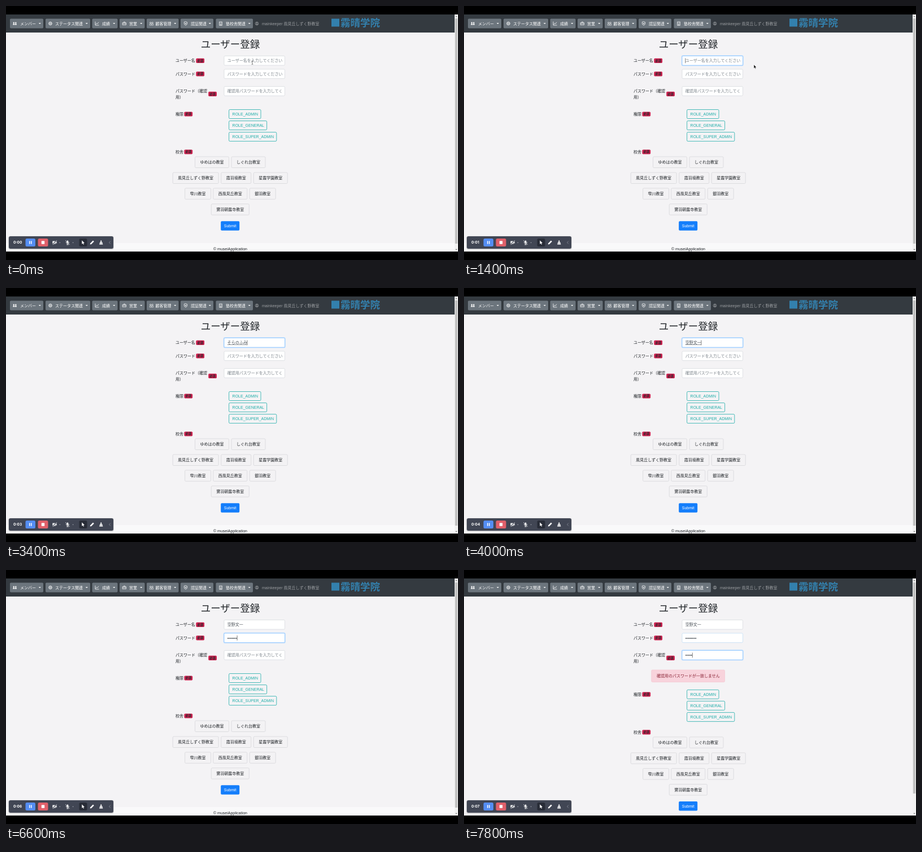
An HTML page that plays this animation: 800 px wide and 450 px high, repeating every 8000 ms.

```html
<!DOCTYPE html>
<html lang="ja">
<head>
<meta charset="utf-8">
<title>ユーザー登録</title>
<style>
html, body { margin: 0; height: 100%; overflow: hidden; background: #000; }
svg { display: block; width: 100vw; height: 100vh; }
text { font-family: "Liberation Sans", "Noto Sans CJK JP", "Noto Sans CJK", sans-serif; font-size: 7px; white-space: pre; }
</style>
</head>
<body>
<svg id="stage" viewBox="0 0 800 450"></svg>
<script>
const LOOP = 8000, STEP = 200, INK = '#212529', TEAL = '#1fada9';

const rect = (x, y, w, h, fill, r = 0, more = '') =>
  `<rect x="${x}" y="${y}" width="${w}" height="${h}" rx="${r}" fill="${fill}" ${more}/>`;
const text = (x, y, s, fill = INK, more = '') =>
  `<text x="${x}" y="${y}" fill="${fill}" ${more}>${s}</text>`;
const path = (d, fill, stroke = 'none', w = 0.8) =>
  `<path d="${d}" fill="${fill}" stroke="${stroke}" stroke-width="${w}" stroke-linecap="round" stroke-linejoin="round"/>`;
const line = (d, stroke = '#fff', w = 0.8) => path(d, 'none', stroke, w);
const at = (x, y, body) => `<g transform="translate(${x} ${y})">${body}</g>`;
const ring = (r, w = 0.8, c = '#fff') => `<circle r="${r}" fill="none" stroke="${c}" stroke-width="${w}"/>`;
const mid = 'text-anchor="middle"';

// Navigation icons, each centred on 0,0
const people = 'M-3.2 2.6v-1q0-1.4 1.5-1.4t1.5 1.4v1zM.3 2.6v-1q0-1.4 1.5-1.4t1.5 1.4v1zM-2.9-1.3a1.2 1.2 0 1 0 2.4 0a1.2 1.2 0 1 0-2.4 0M.6-1.3a1.2 1.2 0 1 0 2.4 0a1.2 1.2 0 1 0-2.4 0';
const icons = {
  team: path(people, '#fff'),
  gear: ring(2.7, 1) + ring(1),
  chart: line('M-3-3V3H3.2M-2 1.4L-.4-.6L.8.6L2.8-2'),
  bag: line('M-3-1.5H3V2.6H-3zM-1.1-1.6v-1.2h2.2v1.2M-3 .4H3', '#fff', 0.7),
  group: path(people, 'none', '#fff', 0.6),
  shield: line('M0-3.2L2.6-2.3V0Q2.4 2.2 0 3.2Q-2.4 2.2-2.6 0V-2.3z') + '<circle r="1" fill="#fff"/>',
  house: line('M-2.4 3V-3H2.4V3zM-.8 3V1.3H.8V3M-1-1.5h.2M.9-1.5h.2M-1 0h.2M.9 0h.2', '#fff', 0.7)
};

// x, width, icon, icon x, label x, label
const menu = [
  [7, 59, 'team', 15.5, 25, 'メンバー'],
  [70, 79, 'gear', 78.5, 87, 'ステータス関連'],
  [152.5, 45, 'chart', 161, 170, '成績'],
  [201, 44.5, 'bag', 209.5, 218, '営業'],
  [249, 56.5, 'group', 257.5, 264.5, '顧客管理'],
  [309, 58, 'shield', 318, 327, '認証関連'],
  [371.5, 65.5, 'house', 380, 389, '塾校舎関連']
];

const nav = rect(0, 15, 794, 32, '#343a40') +
  menu.map(([x, w, icon, ix, tx, label]) =>
    rect(x, 22.5, w, 17, '#6c757d', 1.8) + at(ix, 31, icons[icon]) + text(tx, 33.5, label, '#fff') +
    path(`M${x + w - 8.3} 30h4.2l-2.1 2.1z`, '#fff')).join('') +
  at(444, 31, ring(2.8, 0.7, '#a5a8ab') + '<circle cy="-.7" r="1" fill="#a5a8ab"/>' + line('M-1.7 1.8Q0 .2 1.7 1.8', '#a5a8ab')) +
  text(453, 33.5, 'mainkeeper 風見丘しずく野教室', '#999c9f') +
  rect(576, 22.5, 14, 14, '#3380ad') +
  text(592, 36, '霧晴学院', '#3380ad', 'style="font-size:17.5px;font-weight:700"');

const badge = (x, y) => rect(x, y, 14.8, 8.2, '#cf2351', 1.75) +
  text(x + 2.1, y + 6, '必須', INK, 'style="font-size:5.25px;font-weight:700"');

const labels = text(397, 73.6, 'ユーザー登録', INK, mid + ' style="font-size:17.5px;font-weight:500"') +
  text(300, 99.3, 'ユーザー名') + badge(336.3, 92.8) +
  text(300, 122.8, 'パスワード') + badge(336.3, 116.2) +
  text(300, 153.3, 'パスワード（確認') + text(300, 163.8, '用）') + badge(358.2, 151.8);

const role = (y, w, s) => rect(394.6, y, w, 16, 'none', 1.75, `stroke="${TEAL}" stroke-width=".8"`) +
  text(400.6, y + 10.5, s, TEAL);
const room = (x, y, s) => {
  const w = s.length * 7 + 18;
  return rect(x, y, w, 19.5, '#f3f2f4', 1.75, 'stroke="#d3d3d7" stroke-width=".7"') +
    text(x + w / 2, y + 12.4, s, INK, mid);
};

const lower = text(300, 194, '権限') + badge(315.4, 187.4) +
  role(183.5, 56.4, 'ROLE_ADMIN') + role(203.5, 67, 'ROLE_GENERAL') + role(223.6, 84.2, 'ROLE_SUPER_ADMIN') +
  text(300, 261, '校舎') + badge(315.4, 254.4) +
  room(334.5, 267, 'ゆめはの教室') + room(399, 267, 'しぐれ台教室') +
  room(295.2, 295, '風見丘しずく野教室') + room(380.7, 295, '霞羽境教室') + room(438.2, 295, '星露学園教室') +
  room(316.6, 322.8, '雫川教室') + room(366.8, 322.8, '西風見丘教室') + room(431.2, 322.8, '銀羽教室') +
  room(363.3, 350.7, '鷺羽朝露寺教室') +
  rect(380.2, 381.2, 33, 16.5, '#147efb', 1.75) + text(396.7, 392, 'Submit', '#fff', mid) +
  rect(0, 420, 794, 30, '#f9f9fa') + text(397, 433, '© museiApplication', INK, mid);

const alertBox = rect(331.8, 177, 129.7, 21.5, '#f8d3dc', 1.75, 'stroke="#f3c3cd" stroke-width=".6"') +
  text(341, 190.2, '確認用のパスワードが一致しません', '#8a2436');

const arrow = 'M0 0V6.6L1.6 5.2L2.7 7.5L3.7 7L2.7 4.8H4.7z';

const toolbar = clock =>
  rect(4, 407.5, 187, 24, '#000', 4, 'opacity=".15"') + rect(5, 408, 185, 22, '#414654', 3) +
  text(13, 421.4, clock, '#fff', 'style="font-family:Inter,sans-serif;font-size:6.5px;font-weight:700"') +
  rect(34.5, 412, 17.5, 14, '#548df2', 2.5) + rect(41, 416.3, 1.5, 5.4, '#fff') + rect(44, 416.3, 1.5, 5.4, '#fff') +
  rect(56.5, 412, 18, 14, '#e0606a', 2.5) + rect(62.8, 416.3, 5.4, 5.4, '#fff', 0.5) +
  at(86, 419, path('M-3.6-2.4H1.6V2.4H-3.6zM1.6-.6L3.6-2V2L1.6.6z', '#fff') + line('M-3.4 3.6L3.4-3.6', '#414654', 1.8) + line('M-3 3.8L3.6-3.4')) +
  rect(94.7, 418.6, 1.2, 1.2, '#b9bcc4') +
  at(109, 419, rect(-1.3, -3.6, 2.6, 4.6, '#fff', 1.3) + line('M-2.6-.5Q-2.4 2 0 2T2.6-.5M0 2V3.8M-1.5 3.8H1.5M-3.4-3.4L3.2 3.4')) +
  rect(118, 418.6, 1.2, 1.2, '#b9bcc4') +
  rect(129.5, 412, 14, 14, '#282c37', 2.5) + at(134.3, 415.2, path(arrow, '#fff')) +
  at(152.3, 419, path('M-3.6 3.6L-3 1.2L1.7-3.5L3.5-1.7L-1.2 3z', '#fff')) +
  at(168.3, 419, path('M-.8-3.8H.8V-1H2L3.2 3.6H-3.2L-2-1H-.8z', '#fff') + line('M-2.3 1H2.3', '#414654', 0.6)) +
  line('M184.6 416.8L182.6 419L184.6 421.2', '#8d919c');

const scrollbar = end => rect(794, 15, 6, 420, '#f1f1f1') + path('M795.4 19.3h3.2l-1.6-1.9z', '#666') +
  path('M795.4 430.7h3.2l-1.6 1.9z', '#666') + rect(794.8, 22, 4.4, end - 22, '#c1c1c1');

// value, placeholder, and flags for one input field
function field(y, { value = '', hint, focus, caret, marked, border = '#d3d7dc' }) {
  const x = 391.8, end = x + [...value].reduce((w, c) => w + (c === '•' ? 2.45 : 7), 0);
  return (focus ? rect(384.8, y - 1.2, 109.9, 19, '#bfdeff', 2.6) : '') +
    rect(386, y, 107.5, 16.6, '#fff', 1.75, `stroke="${focus ? '#80bdff' : border}" stroke-width=".7"`) +
    text(x, y + 10.8, value || hint, value ? '#495057' : '#7b838a') +
    (marked ? rect(x, y + 11.9, end - x, 0.6, '#495057') : '') +
    (caret ? rect(end - 0.2, y + 4, 0.6, 8.8, '#222') : '');
}

// Last entry whose start time has passed
const pick = (list, t) => list.reduce((v, [start, next]) => t >= start ? next : v, '');
const nameSteps = [[1800, 'ｓ'], [2000, 'そｒ'], [2200, 'そらｎ'], [2400, 'そらの'], [2600, 'そらのｆ'],
  [3000, 'そらのふ'], [3200, 'そらのふｍ'], [3400, 'そらのふみ'], [3600, 'そらのふみい'],
  [3800, 'そらのふみいち'], [4000, '空野文一']];
const passSteps = [[6000, 1], [6200, 3], [6400, 5], [6600, 7], [6800, 8]];
const checkSteps = [[7400, 2], [7600, 4], [7800, 5]];
const dots = (steps, t) => '•'.repeat(pick(steps, t) || 0);

function pointer(t) {
  if (t < 400) return at(436, 100.5, line('M-1-3Q0-3 0-2.3V2.3Q0 3-1 3M1-3Q0-3 0-2.3M0 2.3Q0 3 1 3', '#333', 0.6));
  if (t >= 2400) return '';
  const k = Math.min(1, (t - 200) / 400);
  return at(436 + 77 * k, 98 + 6 * k, path(arrow, '#111', '#fff', 0.5));
}

function draw(t) {
  const failed = t >= 7000;
  const focus = t < 200 ? 0 : t < 5000 ? 1 : t < 7000 ? 2 : 3;
  stage.innerHTML = rect(0, 15, 800, 420, '#f4f3f5') + nav + labels +
    field(88.5, { value: pick(nameSteps, t), hint: 'ユーザー名を入力してください', focus: focus === 1,
      caret: focus === 1 && (t < 1000 || t >= 1400 && t < 4800), marked: t >= 1800 && t < 4800 }) +
    field(112, { value: dots(passSteps, t), hint: 'パスワードを入力してください', focus: focus === 2,
      caret: focus === 2 && t >= 6000, border: failed ? '#bcdcf4' : undefined }) +
    field(142.5, { value: dots(checkSteps, t), hint: '確認用パスワードを入力してく', focus: focus === 3, caret: focus === 3 }) +
    (failed ? alertBox : '') + at(0, failed ? 28.8 : 0, lower) +
    scrollbar(failed ? 396 : 421) + pointer(t) +
    rect(0, 435, 800, 15, '#000') + rect(0, 0, 800, 15, '#000') +
    toolbar('0:0' + Math.floor(t / 1000));
}

const stage = document.getElementById('stage');
let begin, shown;
function tick(now) {
  begin ??= now;
  const t = Math.floor((now - begin) % LOOP / STEP) * STEP;
  if (t !== shown) draw(shown = t);
  requestAnimationFrame(tick);
}
draw(0);
requestAnimationFrame(tick);
</script>
</body>
</html>
```
